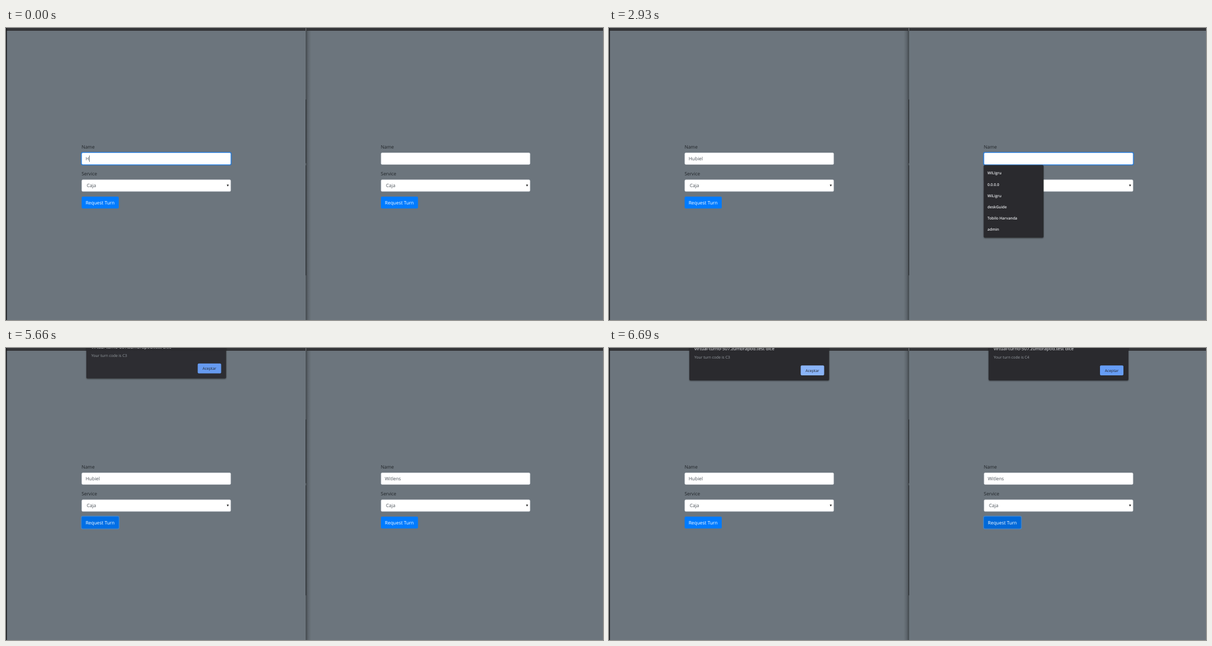
Recreate the animation shown at these times as an HTML page. Size 1070 px wide and 523 px high, loop 7.15 s.

```html
<!DOCTYPE html>
<html lang="en">
<head>
<meta charset="utf-8">
<title>Request a turn</title>
<style>
  html, body { margin: 0; width: 100%; height: 100%; overflow: hidden; background: #6c757d; }
  svg { display: block; width: 1070px; height: 523px; }
  text { font: 8.4px "Open Sans", "Noto Sans", sans-serif; text-rendering: geometricPrecision; white-space: pre; }
</style>
</head>
<body>
<svg id="stage" viewBox="0 0 1070 523">
  <defs>
    <linearGradient id="fadeRight">
      <stop offset="0" stop-color="#000" stop-opacity=".34"/>
      <stop offset=".4" stop-color="#000" stop-opacity=".13"/>
      <stop offset="1" stop-color="#000" stop-opacity="0"/>
    </linearGradient>
    <linearGradient id="fadeLeft" x1="1" x2="0">
      <stop offset="0" stop-color="#000" stop-opacity=".34"/>
      <stop offset=".4" stop-color="#000" stop-opacity=".13"/>
      <stop offset="1" stop-color="#000" stop-opacity="0"/>
    </linearGradient>
    <filter id="drop" x="-10%" y="-20%" width="120%" height="140%">
      <feDropShadow dx="0" dy="1" stdDeviation="1.3" flood-opacity=".5"/>
    </filter>
  </defs>
</svg>
<script>
const LOOP = 7150;
const SHIFT = 536.4;
const BLUE = [0, 123, 255];
const stage = document.getElementById("stage");

function add(parent, tag, attrs, content) {
  const el = document.createElementNS("http://www.w3.org/2000/svg", tag);
  set(el, attrs);
  if (content) el.textContent = content;
  parent.appendChild(el);
  return el;
}
function set(el, attrs) {
  for (const key in attrs) el.setAttribute(key, attrs[key]);
}
const rect = (parent, x, y, width, height, attrs) =>
  add(parent, "rect", { x, y, width, height, ...attrs });
const label = (parent, x, y, str, fill, size = 8.4, weight = 400) =>
  add(parent, "text", { x, y, fill, style: `font-size:${size}px;font-weight:${weight}` }, str);
const show = (el, on) => set(el, { visibility: on ? "visible" : "hidden" });

const ramp = (t, start, length) => Math.min(1, Math.max(0, (t - start) / length));
const within = (t, spans) => spans.some(([a, b]) => t >= a && t < b);
const mix = (a, b, k) => `rgb(${a.map((v, i) => Math.round(v + (b[i] - v) * k))})`;
const count = (t, times) => times.filter(at => t >= at).length;

// Window frames
rect(stage, 0, 0, 1070, 523, { fill: "#6c757d" });
const shadowRight = rect(stage, 538, 5, 9, 518, { fill: "url(#fadeRight)" });
const shadowLeft = rect(stage, 528, 5, 9, 518, { fill: "url(#fadeLeft)" });
rect(stage, 0, 0, 1070, 5, { fill: "#343538" });
rect(stage, 0, 0, 1.5, 523, { fill: "#151618" });
rect(stage, 537, 5, 1, 518, { fill: "#4b5156" });
rect(stage, 537, 0, 1, 5, { fill: "#77797c" });
rect(stage, 537, 128, 1, 114, { fill: "#24272a" });
rect(stage, 537, 246, 1, 197, { fill: "#24272a" });

function makePane(x, name, code) {
  const g = add(stage, "g", { transform: `translate(${x} 0)` });
  const ink = "#212529", soft = "#495057";
  label(g, 135.4, 215.6, "Name", ink);
  const ring = rect(g, 135, 222.7, 268.6, 22.6, { rx: 2.6, fill: "none", stroke: "#007bff", "stroke-width": 1.6 });
  const input = rect(g, 135.8, 223.5, 267, 21, { rx: 2, fill: "#fff", "stroke-width": .6 });
  const value = label(g, 142.7, 237.2, "", soft);
  const caret = rect(g, 0, 228.4, .8, 11.4, { fill: soft });

  label(g, 135.4, 263.7, "Service", ink);
  rect(g, 135.8, 271.8, 267, 21, { rx: 2, fill: "#fff", stroke: "#ced4da", "stroke-width": .6 });
  label(g, 144.7, 285.4, "Caja", soft);
  add(g, "path", { d: "M395.6 280.4h3.8l-1.9 3.6z", fill: "#222" });

  const buttonRing = rect(g, 134.9, 301.2, 67.8, 22.7, { rx: 2.6, fill: "none", stroke: "#268fff", "stroke-width": 1.5 });
  const button = rect(g, 135.6, 301.9, 66.4, 21.4, { rx: 2 });
  label(g, 142.7, 315.8, "Request Turn", "#fff");

  const dialog = add(stage, "g", {});
  rect(dialog, 144, -30, 250.5, 88, { rx: 2, fill: "#292a2d", filter: "url(#drop)" });
  label(dialog, 153, 4.3, "virtual-turno-507.zumbrapod.test dice", "#e8eaed", 8.1);
  label(dialog, 153, 19.4, "Your turn code is " + code, "#9aa0a6", 6.84);
  const accept = rect(dialog, 343.6, 31.2, 42, 17.8, { rx: 2 });
  label(dialog, 352.3, 42.6, "Aceptar", "#202124", 6.8);

  return { x, name, ring, input, value, caret, buttonRing, button, dialog, accept };
}

const left = makePane(0, "Hubiel", "C3");
const right = makePane(SHIFT, "Witlens", "C4");

// Autofill list under the right field
const list = add(stage, "g", {});
const listBox = rect(list, 671.6, 245.6, 107.2, 130, { rx: 2, fill: "#292a2d", filter: "url(#drop)" });
const hints = ["WILIgru", "0.0.0.0", "WiLigru", "deskGuide", "Tobilo Harvanda", "admin"]
  .map(str => label(list, 678.3, 0, str, "#e8eaed", 6.8, 600));

function drawList(open, prefix) {
  set(list, { display: open ? "inline" : "none" });
  let row = 0;
  for (const hint of hints) {
    const match = hint.textContent.toLowerCase().startsWith(prefix);
    set(hint, { display: match ? "inline" : "none" });
    if (match) set(hint, { y: 262.4 + 20.15 * row++ });
  }
  set(listBox, { height: 9 + 20.15 * row });
}

function drawField(pane, chars, focus, caretOn) {
  pane.value.textContent = pane.name.slice(0, chars);
  const end = chars ? pane.value.getComputedTextLength() : 0;
  set(pane.caret, { x: 142.9 + end });
  show(pane.caret, caretOn);
  set(pane.ring, { opacity: .6 * focus });
  set(pane.input, { stroke: mix([206, 212, 218], [90, 165, 255], focus) });
}

function drawButton(pane, hover, focus, tint) {
  set(pane.button, { fill: mix(BLUE, tint, hover) });
  set(pane.buttonRing, { opacity: .6 * focus });
}

// The dialog drops in over four steps
function drawDialog(pane, t, times, active) {
  const step = count(t, times);
  const lift = [0, -7, -3.4, -1, 0][step];
  set(pane.dialog, {
    transform: `translate(${pane.x} ${lift})`,
    opacity: [0, .27, .95, 1, 1][step]
  });
  set(pane.accept, { fill: active ? "#669df6" : "#8ab4f8" });
}

function draw(t) {
  const leftActive = t < 2270 || (t >= 5300 && t < 6230);
  show(shadowRight, leftActive);
  show(shadowLeft, !leftActive);

  drawField(left, 1 + count(t, [180, 260, 410, 550, 700]),
    1 - ramp(t, 2370, 150), within(t, [[0, 1210], [1760, 2270]]));
  drawField(right, count(t, [3260, 3450, 3620, 3800, 3910, 4020, 4130]),
    ramp(t, 2370, 150) - ramp(t, 5300, 140),
    within(t, [[2370, 2930], [3260, 4640], [5150, 5300]]));
  drawList(t >= 2430 && t < 3620, t >= 3300 ? "w" : "");

  const leave = ramp(t, 6230, 130);
  drawButton(left, ramp(t, 5100, 80) - leave, ramp(t, 5300, 140) - leave, [0, 111, 230]);
  drawButton(right, ramp(t, 5900, 80), ramp(t, 6230, 130), [0, 105, 217]);

  drawDialog(left, t, [5610, 5660, 5710, 5740], leftActive);
  drawDialog(right, t, [6540, 6590, 6640, 6690], true);
}

function tick(now) {
  draw(now % LOOP);
  requestAnimationFrame(tick);
}
draw(0);
requestAnimationFrame(tick);
</script>
</body>
</html>
```
